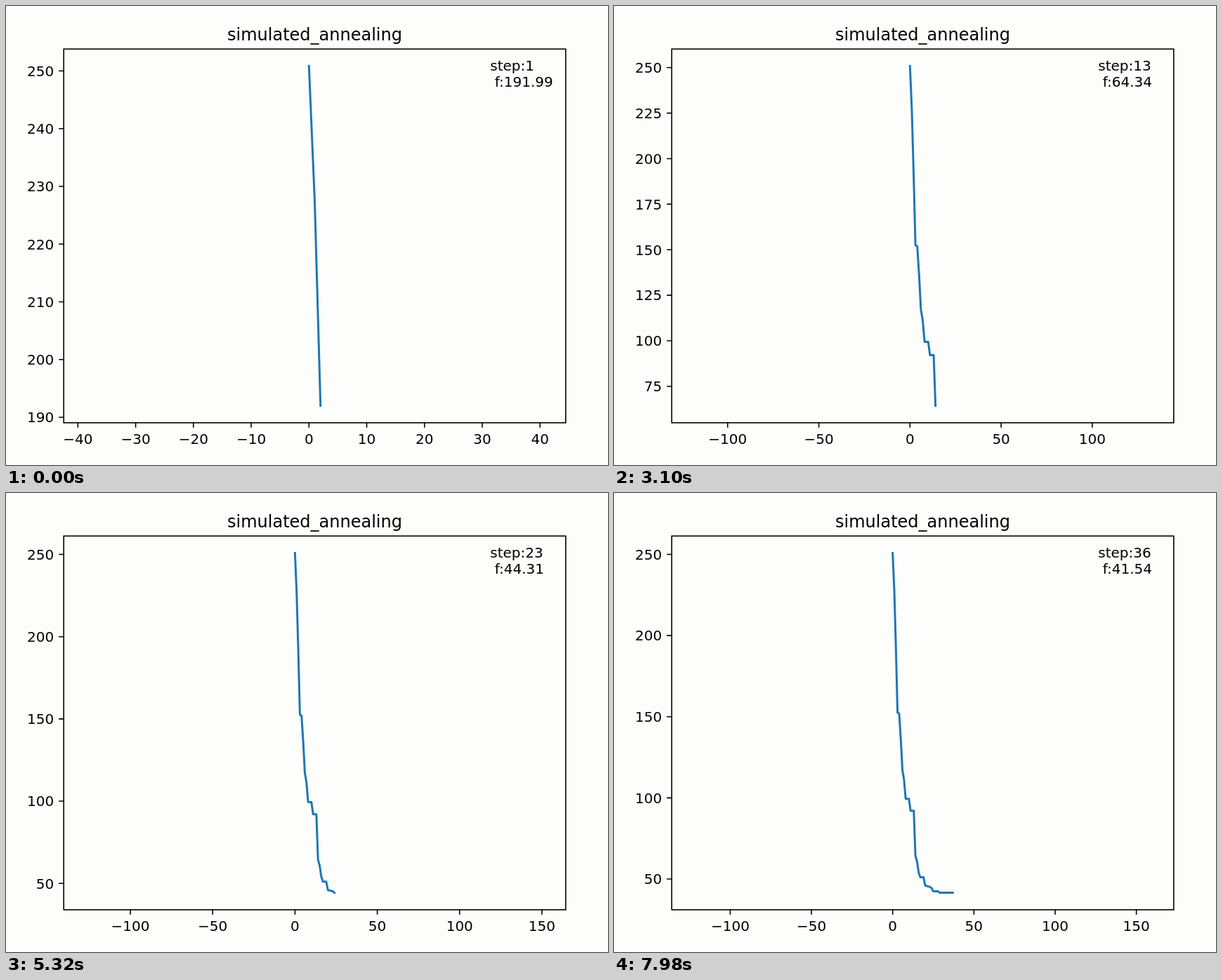
These frames come from a looping animation (857 by 654 pixels, 8000 ms). An HTML page:

```html
<!DOCTYPE html>
<html lang="en">
<head>
<meta charset="utf-8">
<title>simulated_annealing</title>
<style>
  html, body { margin: 0; width: 100%; height: 100%; overflow: hidden; background: #fdfdfc; }
  svg { display: block; width: 100%; height: 100%; }
  text { font: 20px "DejaVu Sans", sans-serif; fill: #000; white-space: pre; }
  .title { font-size: 24px; text-anchor: middle; }
  .x text { text-anchor: middle; }
  .y text { text-anchor: end; }
  .axis { fill: none; stroke: #000; stroke-width: 1.6; }
  #curve { fill: none; stroke: #1f77b4; stroke-width: 3; stroke-linecap: square; stroke-linejoin: round; }
</style>
</head>
<body>
<svg viewBox="0 0 857 654">
  <path id="curve"/>
  <path id="marks" class="axis"/>
  <rect class="axis" x="82.2" y="61.3" width="714.6" height="532.5"/>
  <g id="xLabels" class="x"></g>
  <g id="yLabels" class="y"></g>
  <text class="title" x="439.5" y="49.3">simulated_annealing</text>
  <text id="step" x="689.3" y="91.6"></text>
  <text id="cost" x="695.7" y="114.5"></text>
</svg>
<script>
const LOOP = 8000;
const BOX = { left: 82.2, right: 796.8, top: 61.3, bottom: 593.8 };
const WIDTH = BOX.right - BOX.left;
const HEIGHT = BOX.bottom - BOX.top;
const MARGIN = 0.05;
const TICK = 7;

// Best cost after each iteration; it stays at the last value once converged.
const COSTS = [
  250.85, 227.36, 191.99, 152.53, 151.92, 136.24, 117.18, 111.17, 99.46, 99.41,
  99.41, 92.07, 92.07, 92.07, 64.34, 60.82, 54.03, 51.04, 51.04, 51.04,
  45.98, 45.71, 45.43, 45.18, 44.31, 42.42, 42.42, 42.42, 42.42, 41.54
];
const costAt = i => COSTS[Math.min(i, COSTS.length - 1)];
const el = id => document.getElementById(id);

// Ticks come in threes lasting 20, 20 and 100 ms.
function tickAt(ms) {
  const u = ms + 20;
  const r = u % 140;
  return 3 * Math.floor(u / 140) + (r < 20 ? 0 : r < 40 ? 1 : 2) - 1;
}

const stepAt = ms => Math.max(1, Math.floor(tickAt(ms) * 3 / 14 - 0.6));

// Multiples of the smallest round interval that gives at most nine bins.
function ticks(lo, hi) {
  const raw = (hi - lo) / 9;
  const mag = 10 ** Math.floor(Math.log10(raw));
  const gap = [1, 2, 2.5, 5, 10].find(m => m * mag >= raw) * mag;
  const out = [];
  for (let v = Math.ceil(lo / gap) * gap; v <= hi; v += gap) out.push(v);
  return out;
}

const label = (x, y, v) =>
  `<text x="${x.toFixed(2)}" y="${y.toFixed(2)}">${v < 0 ? "\u2212" + -v : Math.abs(v)}</text>`;

function draw(step) {
  const last = step + 1;
  const high = COSTS[0], low = costAt(last);
  const pad = (high - low) * MARGIN;
  const scale = HEIGHT / (high - low + 2 * pad);
  const half = WIDTH / scale / 2;
  const mid = last / 2;
  const px = x => BOX.left + (x - mid + half) * scale;
  const py = y => BOX.bottom - (y - low + pad) * scale;

  let path = "";
  for (let i = 0; i <= last; i++) {
    path += `${i ? "L" : "M"}${px(i).toFixed(2)} ${py(costAt(i)).toFixed(2)}`;
  }
  el("curve").setAttribute("d", path);

  const xs = ticks(mid - half, mid + half);
  const ys = ticks(low - pad, high + pad);
  el("marks").setAttribute("d",
    xs.map(v => `M${px(v)} ${BOX.bottom}v${TICK}`).join("") +
    ys.map(v => `M${BOX.left} ${py(v)}h${-TICK}`).join(""));
  el("xLabels").innerHTML = xs.map(v => label(px(v), 623.7, v)).join("");
  el("yLabels").innerHTML = ys.map(v => label(BOX.left - 2 * TICK, py(v) + 7.3, v)).join("");

  el("step").textContent = "step:" + step;
  el("cost").textContent = "f:" + low.toFixed(2);
}

let start = null, shown = 0;
function frame(now) {
  if (start === null) start = now;
  const step = stepAt((now - start) % LOOP);
  if (step !== shown) draw(shown = step);
  requestAnimationFrame(frame);
}
draw(shown = 1);
requestAnimationFrame(frame);
</script>
</body>
</html>
```
